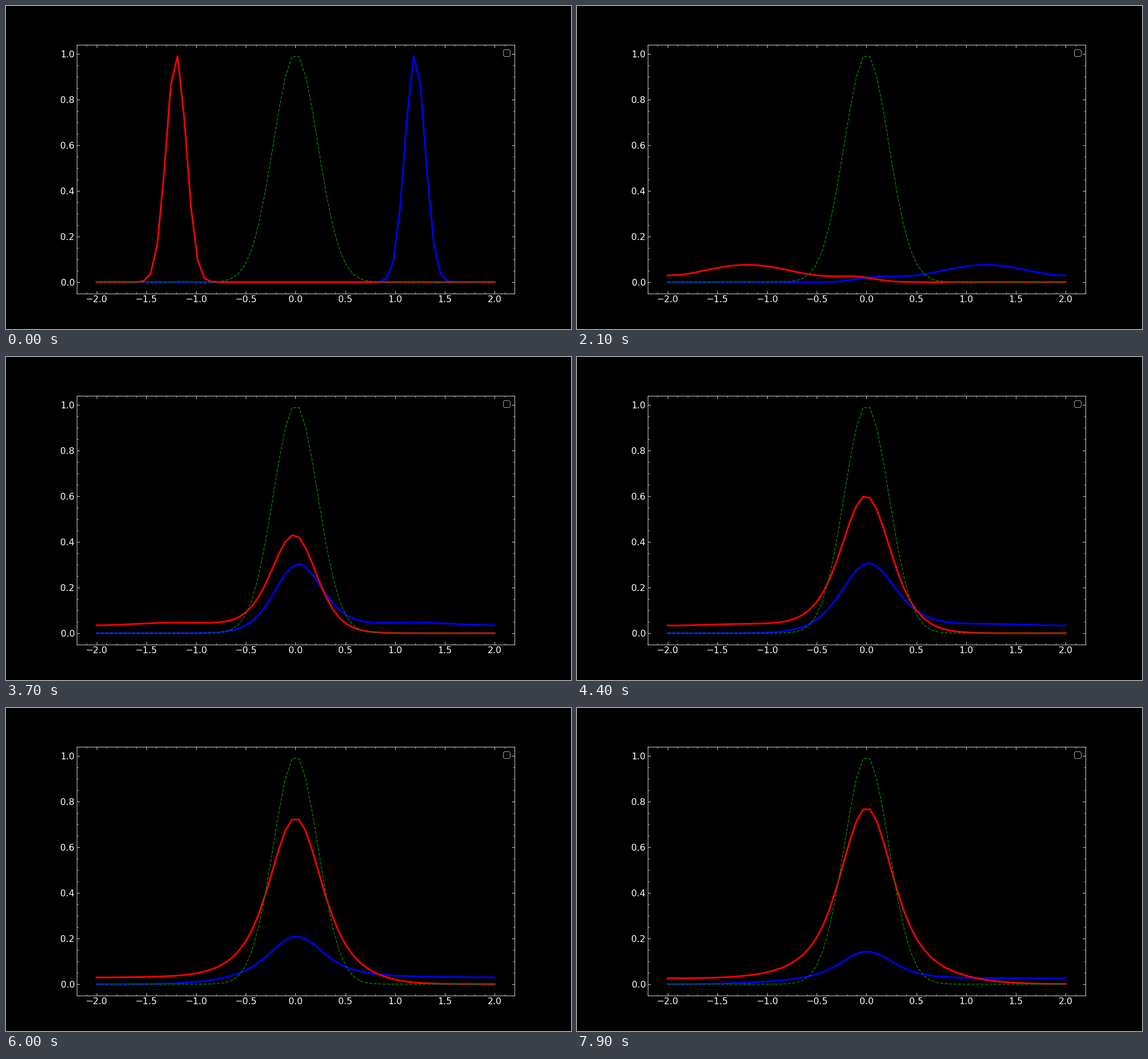
A matplotlib script for the animation above (8000 ms loop, 990 by 566 pixels).

```python
import numpy as np
import matplotlib.pyplot as plt
from matplotlib.animation import FuncAnimation
from matplotlib.ticker import AutoMinorLocator

FRAMES, INTERVAL = 80, 100
DIFFUSION = 0.01
CROSS = np.array([[0.5], [1.0]])  # pressure felt by red from blue, blue from red
DT, DURATION = 0.02, 44

x = np.linspace(-2, 2, 60)
dx = x[1] - x[0]
resource = np.exp(-10 * x**2)
start = np.array([np.exp(-50 * (x + 1.2)**2), np.exp(-50 * (x - 1.2)**2)])


def slope(w):
    """Diffusion with closed ends, growth on the resource, competition."""
    lap = np.empty_like(w)
    lap[:, 1:-1] = w[:, 2:] - 2 * w[:, 1:-1] + w[:, :-2]
    lap[:, 0] = 2 * (w[:, 1] - w[:, 0])
    lap[:, -1] = 2 * (w[:, -2] - w[:, -1])
    return DIFFUSION / dx**2 * lap + w * (resource - w - CROSS * w[::-1])


def simulate():
    w = start
    states = [w]
    for _ in range(round(DURATION / DT)):
        k1 = slope(w)
        k2 = slope(w + DT / 2 * k1)
        k3 = slope(w + DT / 2 * k2)
        k4 = slope(w + DT * k3)
        w = w + DT / 6 * (k1 + 2 * k2 + 2 * k3 + k4)
        states.append(w)
    return np.array(states)


states = simulate()

# Pace: red's central peak climbs through 0.428 on step 37
centre = states[:, 0, 29]
pace = np.argmax(centre >= 0.428) / 37


def state_at(n):
    i, f = divmod(n * pace, 1)
    i = int(i)
    return (1 - f) * states[i] + f * states[i + 1]


plt.style.use("dark_background")
plt.rcParams.update({"font.family": "DejaVu Sans", "font.size": 16})

fig, ax = plt.subplots(figsize=(14, 8.004), dpi=70.72)
fig.subplots_adjust(left=0.125, right=0.9, bottom=0.11, top=0.88)

blue, = ax.plot(x, start[1], color="#0000ff", lw=3)
red, = ax.plot(x, start[0], color="#ff0000", lw=3)
ax.plot(x, resource, color="#008000", ls="--", lw=1.5)

top = start.max()
ax.set_xlim(-2.2, 2.2)
ax.set_ylim(-0.05 * top, 1.05 * top)
ax.xaxis.set_minor_locator(AutoMinorLocator())
ax.yaxis.set_minor_locator(AutoMinorLocator())
ax.tick_params(which="both", direction="in", top=True, right=True)
ax.tick_params(which="major", length=5)
ax.tick_params(which="minor", length=3)
ax.legend(handles=[], labels=[], loc="upper right")


def update(n):
    for line, y in zip((red, blue), state_at(n)):
        line.set_ydata(y)
    return red, blue


anim = FuncAnimation(fig, update, frames=FRAMES, interval=INTERVAL,
                     repeat=True, repeat_delay=0)
plt.show()
```
